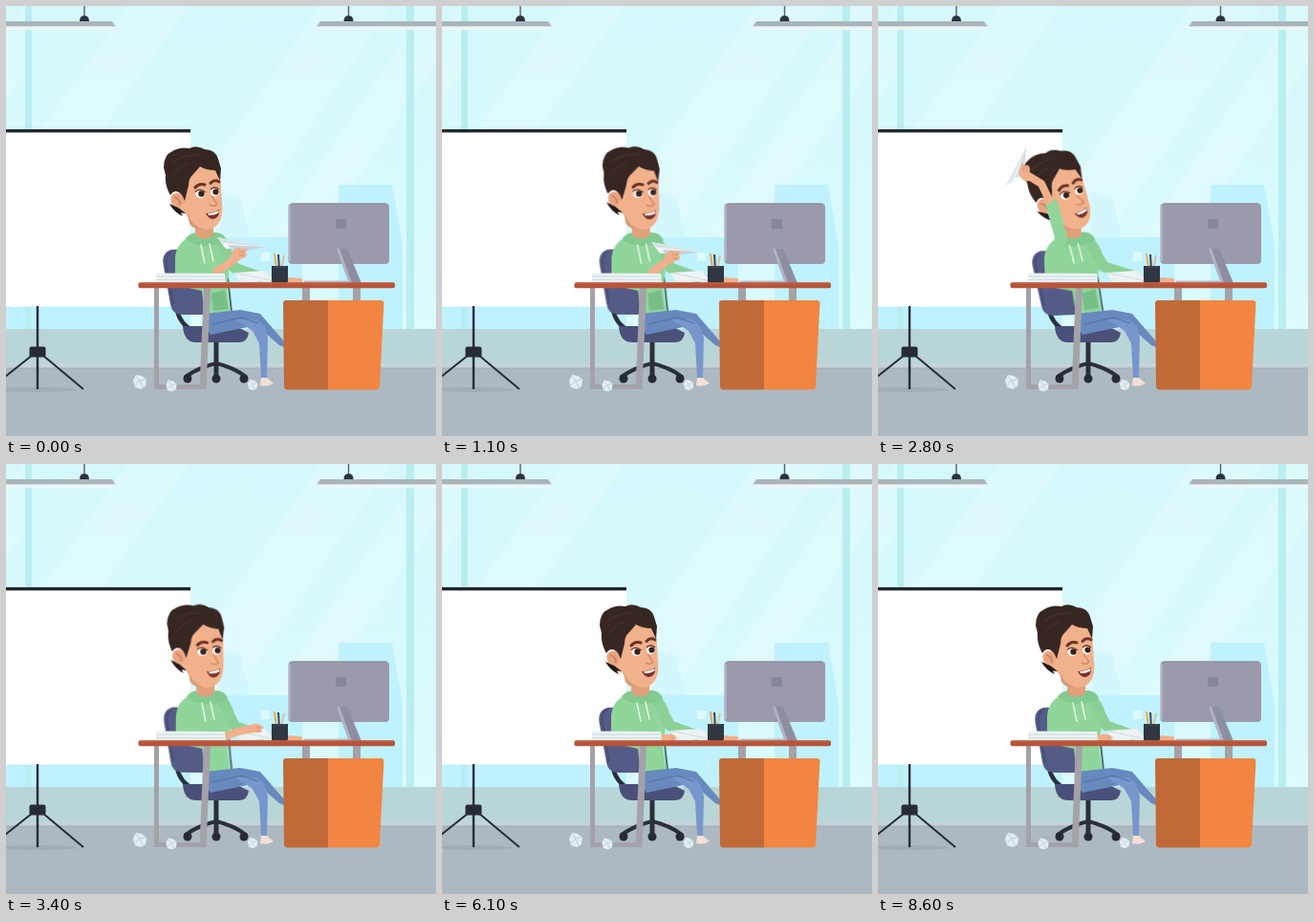
An HTML page for the animation above (10 s loop, 450x450 px).

```html
<!DOCTYPE html>
<html lang="en">
<head>
<meta charset="utf-8">
<title>Paper plane at the desk</title>
<style>
html, body { margin: 0; width: 100%; height: 100%; overflow: hidden; background: #d9fafd; }
svg { display: block; width: 100vw; height: 100vh; }

.head, .body, .sleeve, .skin, .hand, .plane, .pocket {
  animation: 10s linear infinite;
}
.head { animation-name: nod; transform-origin: 208px 234px; }
.body { animation-name: lean; transform-origin: 208px 340px; }
.sleeve { animation-name: sleeve; fill: none; stroke: #90d59a; stroke-width: 13; stroke-linejoin: round; stroke-linecap: round; }
.skin { animation-name: skin; fill: none; stroke: #efb08b; stroke-width: 8; stroke-linejoin: round; stroke-linecap: round; }
.hand { animation-name: hand; }
.plane { animation-name: plane; }
.pocket { animation-name: pocket; animation-timing-function: step-end; }

@keyframes nod {
  0% { transform: rotate(0deg); }
  11% { transform: rotate(2.5deg); }
  22% { transform: rotate(5deg); animation-timing-function: steps(6); }
  28% { transform: rotate(-11.5deg); animation-timing-function: step-end; }
  29% { transform: rotate(-5deg); animation-timing-function: step-end; }
  30% { transform: rotate(4deg); }
  34% { transform: rotate(3deg); }
  41%, 100% { transform: rotate(0deg); }
}
@keyframes lean {
  0% { transform: rotate(0deg); }
  22% { transform: rotate(.7deg); animation-timing-function: steps(6); }
  28% { transform: rotate(-2.3deg); animation-timing-function: step-end; }
  29% { transform: rotate(-1deg); animation-timing-function: step-end; }
  30% { transform: rotate(1deg); }
  41%, 100% { transform: rotate(0deg); }
}
@keyframes sleeve {
  0% { d: path("M188 257 L197 283 L221 277"); }
  11%, 15% { d: path("M188 257 L197 283 L220 278"); }
  20%, 22% { d: path("M190 255 L196 273 L217 257"); animation-timing-function: steps(6); }
  28% { d: path("M192 244 L187 226 L182 208"); animation-timing-function: step-end; }
  29% { d: path("M192 250 L208 240 L224 226"); animation-timing-function: step-end; }
  30% { d: path("M192 252 L211 258 L231 256"); }
  34%, 41% { d: path("M188 257 L199 282 L228 284"); }
  45%, 100% { d: path("M188 257 L194 283 L222 287"); }
}
@keyframes skin {
  0% { d: path("M221 277 L231 271 L243 262"); }
  11%, 15% { d: path("M220 278 L229 272 L240 264"); }
  20%, 22% { d: path("M222 254 L230 246 L241 238"); animation-timing-function: steps(6); }
  28% { d: path("M179 203 L171 186 L156 177"); animation-timing-function: step-end; }
  29% { d: path("M226 224 L238 213 L252 203"); animation-timing-function: step-end; }
  30% { d: path("M233 256 L247 253 L262 248"); }
  34%, 41% { d: path("M232 284 L243 280 L257 277"); }
  45%, 100% { d: path("M228 287 L234 287 L240 287"); }
}
@keyframes hand {
  0% { transform: translate(243px, 260px) rotate(0deg); }
  11%, 15% { transform: translate(240px, 263px) rotate(0deg); }
  20%, 22% { transform: translate(243px, 236px) rotate(10deg); animation-timing-function: steps(6); }
  28% { transform: translate(154px, 175px) rotate(-75deg); animation-timing-function: step-end; }
  29% { transform: translate(254px, 202px) rotate(-5deg); animation-timing-function: step-end; }
  30% { transform: translate(265px, 247px) rotate(20deg); }
  34%, 41% { transform: translate(261px, 277px) rotate(22deg) scale(.8); }
  45%, 100% { transform: translate(239px, 287px) rotate(25deg) scale(.65); }
}
@keyframes plane {
  0% { transform: translate(244px, 253px); opacity: 1; }
  11%, 15% { transform: translate(242px, 258px); opacity: 1; }
  20%, 22% { transform: translate(252px, 238px) rotate(41deg); opacity: 1; animation-timing-function: steps(6); }
  28% { transform: translate(149px, 171px) rotate(-73deg) scale(.9); opacity: .8; animation-timing-function: step-end; }
  29% { transform: translate(284px, 178px) rotate(-22deg); opacity: .9; animation-timing-function: step-end; }
  30% { transform: translate(345px, 143px) rotate(-20deg); opacity: .9; animation-timing-function: step-end; }
  31% { transform: translate(351px, 139px) rotate(-20deg); opacity: .4; animation-timing-function: step-end; }
  32%, 100% { transform: translate(351px, 139px) rotate(-20deg); opacity: 0; }
}
@keyframes pocket {
  0% { opacity: .5; }
  34%, 100% { opacity: 0; }
}
</style>
</head>
<body>
<svg viewBox="0 0 450 450" preserveAspectRatio="none">
  <defs>
    <linearGradient id="glass" x2="0" y2="1">
      <stop stop-color="#d5f8fc"/><stop offset="1" stop-color="#dbfbfd"/>
    </linearGradient>
    <g id="ball">
      <path d="M-7 -2L-4 -8L2 -7L7 -3L6 4L1 7L-5 5Z" fill="#e3eef2"/>
      <path d="M-4 -6L0 -2L6 -3M0 -2L-5 3M0 -2L3 5" fill="none" stroke="#bccbd3"/>
    </g>
    <g id="mount">
      <path d="M0 0V12" stroke="#586168" stroke-width="1.4"/>
      <path d="M-5 16Q-5 10 0 10Q5 10 5 16Z" fill="#2a333d"/>
    </g>
  </defs>

  <!-- Window wall -->
  <rect width="450" height="340" fill="url(#glass)"/>
  <g fill="#e6fcfe" opacity=".45">
    <path d="M127 0H191L101 129H37Z"/>
    <path d="M328 0H403L229 259L195 198Z"/>
    <path d="M419 30V105L262 338H214Z"/>
    <path d="M427 0H450V60L427 95Z"/>
    <path d="M0 25L20 0V70L0 98Z"/>
  </g>
  <g fill="#b8f0fe" opacity=".8">
    <path d="M348 187H404L415 250V338H348Z"/>
    <path d="M223 193L245 202L255 242H223Z" opacity=".35"/>
    <path d="M223 242H310V338H223Z"/>
    <path d="M0 314H193V338H0Z"/>
  </g>
  <path d="M267 258H276V267H267Z" fill="#dffaff"/>
  <path d="M20 0H27V338H20Z M419 0H427V338H419Z" fill="#b9eef1"/>
  <rect y="338" width="450" height="37" fill="#b8d6d8"/>
  <rect y="374" width="450" height="5" fill="#c5d3d8"/>
  <rect y="379" width="450" height="71" fill="#adb9c2"/>
  <path d="M0 379H450" stroke="#9eabb3"/>

  <!-- Lamps -->
  <use href="#mount" x="82"/>
  <use href="#mount" x="358.500"/>
  <path d="M0 16H111L115 21.500H0Z M329 16H450V21.500H325Z" fill="#aab5ba"/>
  <path d="M0 21.500H115L112 25H0Z M325 21.500H450V25H328Z" fill="#edf6f7"/>

  <!-- Projection screen -->
  <rect y="131" width="193" height="183.500" fill="#fff"/>
  <rect y="129" width="193" height="3.400" fill="#20262d"/>
  <ellipse cx="33" cy="401.500" rx="42" ry="2.500" fill="#a1adb6"/>
  <g stroke="#272b38" stroke-width="2.400" fill="none">
    <path d="M33 314V401"/>
    <path d="M28 365L-1 388M38 365L81 401" stroke-width="2"/>
  </g>
  <rect x="24.500" y="356.500" width="17" height="11" rx="2" fill="#272b38"/>

  <!-- Chair base -->
  <g fill="none" stroke="#2a2f3a" stroke-linecap="round">
    <path d="M179 318Q182 333 196 340" stroke-width="4.500"/>
    <path d="M220 350V386" stroke-width="5"/>
    <path d="M188 388Q202 378 220 374Q238 378 251 388" stroke-width="4"/>
  </g>
  <g fill="#252a34">
    <circle cx="190" cy="390" r="4.500"/><circle cx="220" cy="390" r="4.500"/><circle cx="249" cy="390" r="4.500"/>
  </g>
  <path d="M185 335Q186 352 199 352H243Q253 352 254 342L240 335Z" fill="#4a5079"/>

  <!-- Body -->
  <g class="body">
    <path d="M173 255Q163 258 164.500 270L172 312Q174 323 184 323H212V270L192 262Q184 253 173 255Z" fill="#555b87"/>
    <path d="M173 257Q166 261 168 272L175 312" fill="none" stroke="#484e78" stroke-width="2"/>
    <path d="M232 284L236 320" stroke="#4a6d68" stroke-width="2"/>
    <path d="M191 242Q178 249 177 264V292L205 298L208 324H235L231 295L235 268Q234 247 227 240Z" fill="#90d59a"/>
    <path class="pocket" d="M215 301L229 297L232 317L217 319Z" fill="#5da773"/>
    <path d="M224 247Q230 252 233 263L239 274L270 285" fill="none" stroke="#8ad096" stroke-width="11" stroke-linejoin="round"/>
    <path d="M188 243Q193 237 201 237H221Q229 239 231 245Q221 252 207 251Q193 250 188 243Z" fill="#82ca90"/>
    <path d="M198 225H217V240Q208 247 198 240Z" fill="#e0a17b"/>
    <path d="M204 250L208 269M213 249L217 267" stroke="#f2faf2" stroke-width="1.300" stroke-linecap="round"/>
  </g>
  <path d="M268 284Q285 286 308 287.500" fill="none" stroke="#efb08b" stroke-width="5" stroke-linecap="round"/>

  <!-- Legs -->
  <path d="M208 322L245 318L266 322L291 351V357L286 355L262 334L243 338L214 344Q206 335 208 322Z" fill="#6789bd"/>
  <path d="M240 328L262 328Q272 333 274 348L273 389H267L265 353L258 340Z" fill="#7896cb"/>
  <path d="M216 333L246 326L264 332" fill="none" stroke="#54739f" stroke-width="1.200"/>
  <path d="M267 389H273L280 395Q273 399 266 397Z" fill="#f3dfd6"/>

  <!-- Desk -->
  <g fill="none" stroke="#a4a2a8">
    <path d="M157.500 295V398.500H207" stroke-width="5"/>
    <path d="M210.500 295L206 401" stroke-width="7"/>
    <path d="M314 294V309M367 294V309" stroke-width="8"/>
  </g>
  <path d="M290 311Q290 308 293 308H337V401.500H294Q291 401 291 398Z" fill="#c16a38"/>
  <path d="M337 308H392Q395.500 308 395.500 311L391 398Q391 401.500 387 401.500H337Z" fill="#f18541"/>
  <use href="#ball" x="140" y="394"/>
  <use href="#ball" transform="translate(173 398) scale(.8)"/>
  <use href="#ball" transform="translate(258 397) scale(.75)"/>

  <!-- Monitor -->
  <path d="M312 288.500H367" stroke="#b7b9c8" stroke-width="2"/>
  <rect x="295.500" y="206.500" width="105.500" height="63.500" rx="4" fill="#9b9aac"/>
  <path d="M297 209V267" stroke="#b0b1c0" stroke-width="2"/>
  <path d="M299 207H398" stroke="#858599"/>
  <path d="M346 254H357L372 290H359Z" fill="#8d8ea1"/>
  <path d="M346 254H349L362 290H359Z" fill="#b2b4c4"/>
  <rect x="345" y="223" width="11" height="10" fill="#87879a"/>

  <!-- Head -->
  <g class="head">
    <path d="M182 182Q188 164 206 163Q222 163 224 177L226 205Q228 221 221 229Q213 237 203 232Q193 227 189 219L180 211Z" fill="#f0b18b"/>
    <path d="M190 218Q195 230 207 234Q197 235 192 228Z" fill="#d99974"/>
    <path d="M171 207L179 210L188 217L183 216.500L185 220Q176 216 171 207Z" fill="#221b1a"/>
    <ellipse cx="179" cy="203" rx="6.500" ry="7.500" fill="#eaa580" transform="rotate(-20 179 203)"/>
    <path d="M176 200Q182 201 182 208" fill="none" stroke="#c67f5f" stroke-width="1.400"/>
    <path d="M172 198Q166 188 167 177L165 169Q165 156 174 152Q182 147 192 149Q199 145 208 150Q219 150 222 160L225 170L224 183L219 172Q210 172 203 168L196 176Q191 180 191 188L187 204Q184 196 181 195Q176 192 172 198Z" fill="#372722"/>
    <path d="M174 164Q186 155 202 156M174 178Q182 167 191 165" fill="none" stroke="#46332b" stroke-width="1.200"/>
    <path d="M198 190Q202 185 208 187M214 185.500Q218 181 223 184" fill="none" stroke="#6a3324" stroke-width="3" stroke-linecap="round"/>
    <ellipse cx="203.500" cy="196.500" rx="5" ry="4.500" fill="#fff"/>
    <ellipse cx="218.500" cy="194.500" rx="4.500" ry="4.500" fill="#fff"/>
    <circle cx="204.500" cy="196.500" r="3.200" fill="#3c211b"/>
    <circle cx="219.500" cy="194.500" r="3.100" fill="#3c211b"/>
    <path d="M198 194.500Q203 190 209 195M214 192Q218 188 223 192" fill="none" stroke="#623827" stroke-width="1.200"/>
    <path d="M215 199L221 207Q218 211 213 208" fill="none" stroke="#d28b68" stroke-width="1.500"/>
    <path d="M209 217Q217 217 223 213Q224 221 217 223Q212 223 209 217Z" fill="#7b342f"/>
    <path d="M211 217.500Q217 217 222.500 214V216.500Q217 219.500 212 219Z" fill="#fff"/>
  </g>

  <!-- Things on the desk -->
  <path d="M239 279L271 277L282 288L245 289Z" fill="#edf3f4"/>
  <path d="M239 279L282 288" stroke="#cfdade"/>
  <g stroke-width="2">
    <path d="M281 259L283 276" stroke="#e3ad58"/>
    <path d="M285 260L286 276" stroke="#3b4254"/>
    <path d="M291 261L288 276" stroke="#d4c69e"/>
  </g>
  <path d="M278 272H295V288Q295 290 293 290H280Q278 290 278 288Z" fill="#303642"/>
  <path d="M280 273H293" stroke="#495161"/>

  <!-- Throwing arm -->
  <path class="sleeve" d="M188 257L197 283L221 277"/>
  <path class="skin" d="M221 277L231 271L243 262"/>
  <g class="plane">
    <path d="M-23 -11L28 -1L-14 1Z" fill="#f4f9fb"/>
    <path d="M-23 -11L28 -1L-17 -5Z" fill="#d5e2e8"/>
    <path d="M-12 -3L28 -1L-4 5Z" fill="#c5d3db"/>
  </g>
  <g class="hand">
    <path d="M-8 2Q-6 -6 0 -7L9 -6Q11 -4 7 -3L9 0Q8 4 3 4L-3 7Q-8 7 -8 2Z" fill="#efb08b"/>
    <path d="M1 -3L7 -3M1 1L7 1" stroke="#d28b68" stroke-width=".9"/>
  </g>

  <!-- Paper stack and desk top -->
  <path d="M157 279.500L229 280L230 290H157Z" fill="#eaf2f4"/>
  <path d="M157 283H228M157 286.500H230" stroke="#cfdbdf"/>
  <rect x="138.500" y="289.300" width="268.500" height="6" rx="2" fill="#b7543a"/>
  <path d="M140 290H405" stroke="#c7654a"/>
</svg>
</body>
</html>
```
